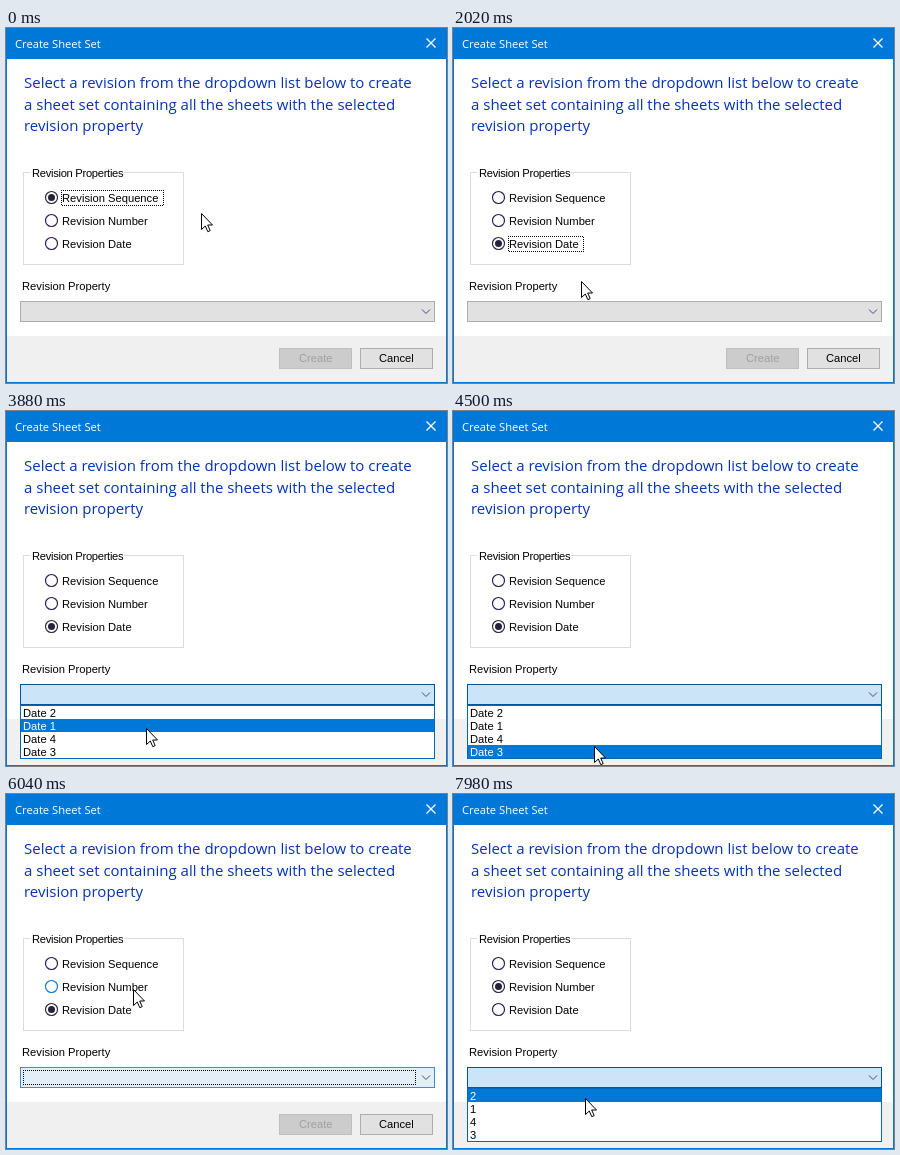
Write an HTML page that moves like this. It is 441 px wide and 355 px high and loops after 8000 ms.

```html
<!DOCTYPE html>
<html lang="en">
<head>
<meta charset="utf-8">
<title>Create Sheet Set</title>
<style>
  html, body { margin: 0; width: 100%; height: 100%; overflow: hidden; background: #fff; }
  svg { display: block; width: 441px; height: 355px; }
  rect { shape-rendering: crispEdges; }
  text { font: 11.2px "Liberation Sans", Arial, sans-serif; fill: #000; white-space: pre; }
  .title { font: 11.2px "Open Sans", "Noto Sans", sans-serif; fill: #fff; }
  .head { font: 15px "Open Sans", "Noto Sans", sans-serif; fill: #0433b5; }
  .legend { letter-spacing: -.3px; }
  .line { fill: none; }
  .focus { fill: none; stroke: url(#dots); }
  .ring { fill: #fff; stroke: #2a1a50; stroke-width: 1.15; }
  .dot { fill: #26243a; }
  .on .ring { stroke: #26243a; }
  .hover .ring { stroke: #0078d7; }
  .hover .dot { fill: #0078d7; }
  .down .ring { fill: #cce4f7; stroke: #005499; }
  .down .dot { fill: #005499; }
  .dot, .focus { visibility: hidden; }
  .on .dot, .focused .focus { visibility: visible; }
  #box { fill: #e1e1e1; stroke: #adadad; }
  .focused #box { fill: #e3eef7; stroke: #3590d4; }
  .hover #box { fill: #e5f1fb; stroke: #0078d7; }
  .down #box { fill: #cce4f7; stroke: #005499; }
  .row rect { fill: #fff; }
  .row.hot rect { fill: #0078d7; }
  .row.hot text { fill: #fff; }
</style>
</head>
<body>
<svg viewBox="0 0 441 355">
  <pattern id="dots" width="2" height="2" patternUnits="userSpaceOnUse">
    <rect x="1" width="1" height="1"/><rect y="1" width="1" height="1"/>
  </pattern>
  <rect width="441" height="355" fill="#0078d7"/>
  <rect x="1" y="31" width="439" height="277" fill="#fff"/>
  <rect x="1" y="308" width="439" height="46" fill="#f0f0f0"/>
  <text class="title" x="9" y="20">Create Sheet Set</text>
  <path class="line" stroke="#fff" stroke-width="1.300" d="M420.500 10.500l9 9m0-9l-9 9"/>

  <text class="head" x="18" y="60">Select a revision from the dropdown list below to create</text>
  <text class="head" x="18" y="82">a sheet set containing all the sheets with the selected</text>
  <text class="head" x="18" y="103">revision property</text>

  <rect class="line" x="17.500" y="144.500" width="160" height="92" stroke="#dcdcdc"/>
  <rect x="24" y="140" width="94" height="9" fill="#fff"/>
  <text class="legend" x="26" y="149">Revision Properties</text>
  <g id="radios"></g>

  <text x="16" y="262">Revision Property</text>
  <g id="combo">
    <rect id="box" x="14.500" y="273.500" width="414" height="20"/>
    <rect class="focus" x="17.500" y="276.500" width="392" height="14"/>
    <path class="line" stroke="#4a4a70" d="M416 281.500l4 4 4-4"/>
  </g>

  <rect x="273.500" y="320.500" width="72" height="20" fill="#ccc" stroke="#bfbfbf"/>
  <text x="293" y="334" style="fill:#a0a0a0">Create</text>
  <rect x="354.500" y="320.500" width="72" height="20" fill="#e1e1e1" stroke="#adadad"/>
  <text x="373" y="334">Cancel</text>

  <g id="list">
    <rect x="14.500" y="294.500" width="414" height="53" fill="#fff" stroke="#0067b8"/>
  </g>
  <path id="cursor" fill="#fff" stroke="#000" d="M.5 .5V16.500L4.300 13 6.800 18.700 9.200 17.600 6.700 12H11.500Z"/>
</svg>
<script>
const LOOP = 8000, STEP = 77, HOLD = 80;
const RADIO_Y = 169.5, RADIO_GAP = 23, LIST_Y = 295, ROW = 13;
const SEQ = 0, NUM = 1, DATE = 2, NONE = -1;
const click = { date: 1010, open: 2560, close: 5500, number: 6350, reopen: 7520 };

// The pointer slows into each stop, and glides evenly over the open list
const home = { x: 195, y: 185 };
const moves = [
  { from: 90, to: 630, x: 112, y: 216 },
  { from: 1720, to: 2480, x: 139, y: 278 },
  { from: 3190, to: 4350, x: 141, y: 340, even: true },
  { from: 4500, to: 5270, x: 136, y: 282, even: true },
  { from: 5500, to: 6270, x: 126, y: 188 },
  { from: 6970, to: 7680, x: 132, y: 286 },
  { from: 7830, to: 7980, x: 132, y: 304 }
];

const $ = id => document.getElementById(id);
const within = (t, a, b) => t >= a && t < b;

function add(parent, cls, html) {
  const g = document.createElementNS('http://www.w3.org/2000/svg', 'g');
  g.setAttribute('class', cls);
  g.innerHTML = html;
  parent.appendChild(g);
  return g;
}

const radios = [['Sequence', 102], ['Number', 91], ['Date', 75]].map(([name, w], i) => {
  const y = RADIO_Y + RADIO_GAP * i;
  return add($('radios'), 'radio',
    `<circle class="ring" cx="45.500" cy="${y}" r="6"/><circle class="dot" cx="45.500" cy="${y}" r="3.500"/>` +
    `<text x="56" y="${y + 4.5}">Revision ${name}</text>` +
    `<rect class="focus" x="55.500" y="${y - 7}" width="${w}" height="15"/>`);
});
const rows = [2, 1, 4, 3].map((n, i) => {
  const y = LIST_Y + ROW * i;
  const g = add($('list'), 'row',
    `<rect x="15" y="${y}" width="413" height="${ROW}"/><text x="17" y="${y + 11}"></text>`);
  return { g, n };
});

// Moves advance in screen updates, the first one already under way
function pointer(t) {
  let { x, y } = home;
  for (const m of moves) {
    if (t < m.from) break;
    const count = Math.round((m.to - m.from) / STEP) + 1;
    const k = Math.min(1, (Math.floor((t - m.from + 6) / STEP) + 1) / count);
    const e = m.even ? k : 1 - (1 - k) ** 2;
    x += (m.x - x) * e;
    y += (m.y - y) * e;
  }
  return [Math.round(x), Math.round(y)];
}

function draw(now) {
  const t = now % LOOP;
  const [x, y] = pointer(t);
  const checked = t < click.date + HOLD ? SEQ : t < click.number + 2 * HOLD ? DATE : NUM;
  const focused = t < click.date ? SEQ : t < click.open ? DATE
    : within(t, click.number, click.reopen) ? NUM : NONE;
  const pressed = within(t, click.date, click.date + HOLD) ? DATE
    : within(t, click.number, click.number + 2 * HOLD) ? NUM : NONE;
  const down = within(t, click.open, click.close) || t >= click.reopen;
  const open = within(t, click.open + HOLD, click.close) || t >= click.reopen + HOLD;

  radios.forEach((g, i) => {
    const c = g.classList;
    const near = Math.abs(y - RADIO_Y - RADIO_GAP * i) < 9;
    c.toggle('on', i === checked);
    c.toggle('focused', i === focused);
    c.toggle('hover', near && x < 158 - 13 * i);
    c.toggle('down', i === pressed);
  });

  const c = $('combo').classList;
  c.toggle('down', down);
  c.toggle('hover', within(y, 273, 294));
  c.toggle('focused', within(t, click.close, click.number));

  // The top row stays lit when the pointer leaves the list upwards
  const row = Math.floor((y - LIST_Y) / ROW);
  const hot = within(t, 4500, click.close) ? Math.max(0, row) : row;
  $('list').style.display = open ? '' : 'none';
  rows.forEach(({ g, n }, i) => {
    g.classList.toggle('hot', i === hot);
    g.lastChild.textContent = (checked === DATE ? 'Date ' : '') + n;
  });
  $('cursor').setAttribute('transform', `translate(${x} ${y})`);
}

let begin;
function tick(now) {
  begin ??= now;
  draw(Math.max(0, now - begin));
  requestAnimationFrame(tick);
}
draw(0);
requestAnimationFrame(tick);
</script>
</body>
</html>
```
